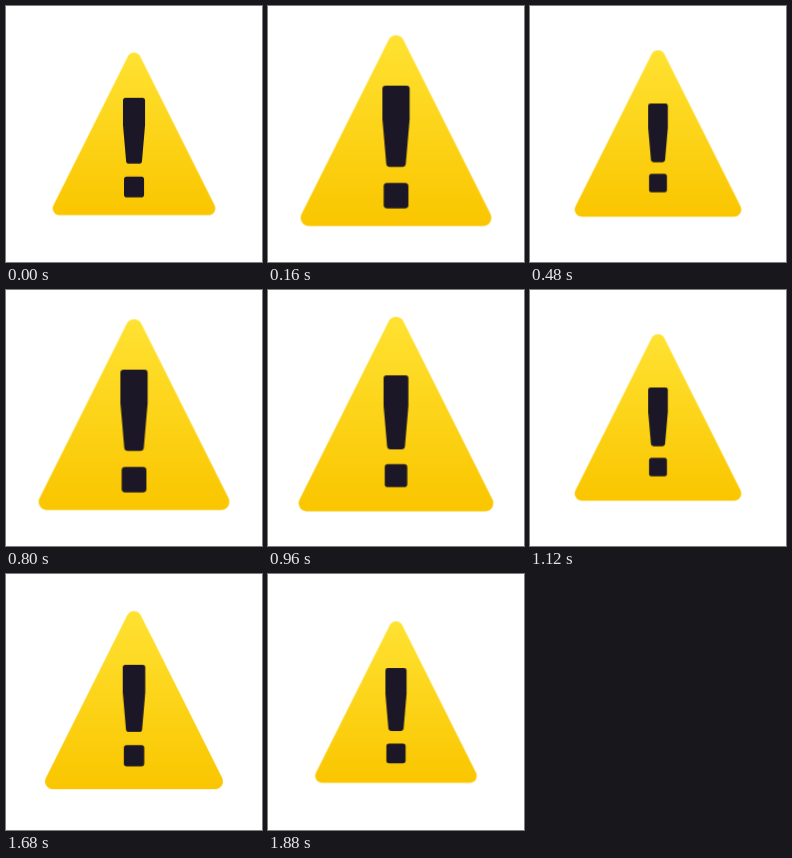
These frames come from a looping animation (256x256 px, 1920 ms). An HTML page:

```html
<!DOCTYPE html>
<html lang="en">
<head>
<meta charset="utf-8">
<title>Warning sign</title>
<style>
  html, body { margin: 0; width: 100%; height: 100%; overflow: hidden; background: #fff; }
  svg { display: block; width: 100vw; height: 100vh; }

  .sign, .mark { animation: 640ms infinite; }
  .sign {
    transform-origin: 128px 147px;
    animation-name: swell;
    animation-delay: -16ms;
    animation-timing-function: ease;
  }
  /* The mark runs a quarter cycle ahead of the sign. */
  .mark {
    transform-origin: 128px 144px;
    animation-name: pulse;
    animation-delay: -160ms;
    animation-timing-function: ease-in;
  }
  @keyframes swell {
    0%, 100% { transform: scale(.996); }
    50% { transform: scale(1.209); }
  }
  @keyframes pulse {
    0%, 100% { transform: scale(.894); }
    50% { transform: scale(1.237); }
  }
</style>
</head>
<body>
<svg viewBox="0 0 256 256" role="img" aria-label="Warning">
  <defs>
    <linearGradient id="gold" x1="0" y1="0" x2="0" y2="1">
      <stop offset="0" stop-color="#ffe232"/>
      <stop offset="1" stop-color="#fac600"/>
    </linearGradient>
  </defs>
  <path class="sign" fill="url(#gold)" d="M121.74 50.87A7 7 0 0 1 134.26 50.87L208.26 198.87A7 7 0 0 1 202 209H54A7 7 0 0 1 47.74 198.87Z"/>
  <g class="mark" fill="#1c1726">
    <path d="M119.5 92H136.5Q139 92 139 94.5V119L135.9 155Q135.6 157.6 133 157.6H123Q120.4 157.6 120.1 155L117 119V94.5Q117 92 119.5 92Z"/>
    <rect x="118" y="170.6" width="20" height="20.6" rx="2.8"/>
  </g>
</svg>
</body>
</html>
```
